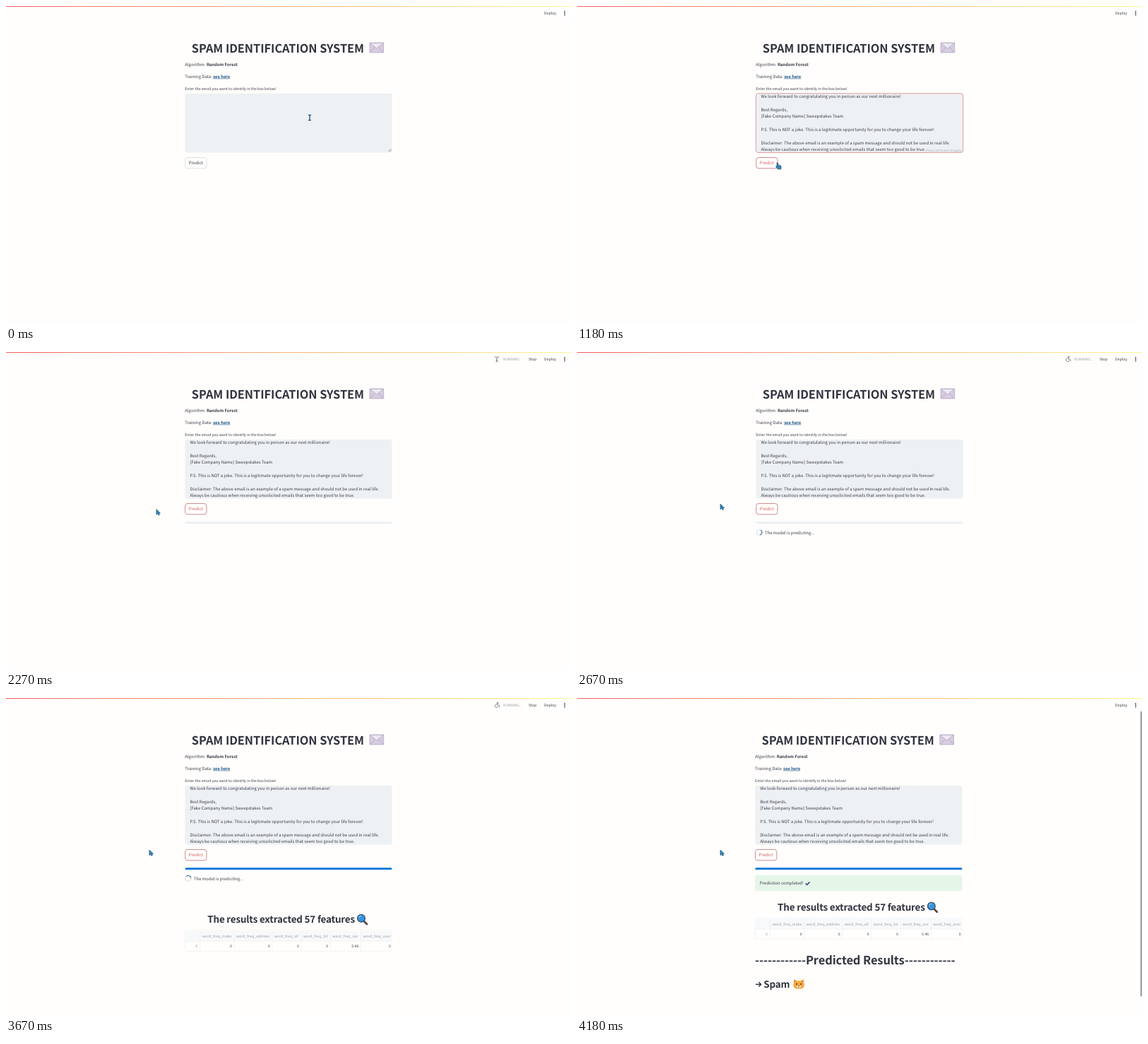
Write an HTML page that moves like this. It is 800 px wide and 450 px high and loops after 4.33 s.

```html
<!DOCTYPE html>
<html lang="en">
<head>
<meta charset="utf-8">
<title>Spam identification system</title>
<style>
html, body { margin: 0; width: 100%; height: 100%; overflow: hidden; background: #fffefc; }
svg { display: block; width: 800px; height: 450px; }
text {
  font: 5.97px "Source Sans Pro", "Noto Sans CJK JP", "Noto Sans CJK SC", "Noto Sans CJK", "Open Sans", sans-serif;
  fill: #3a3c47; white-space: pre; text-rendering: geometricPrecision;
}
.h1 { font-size: 16.41px; font-weight: 700; letter-spacing: -.005em; fill: #31333f; }
.h2 { font-size: 13.43px; font-weight: 600; letter-spacing: -.014em; fill: #31333f; }
.b { font-weight: 600; letter-spacing: -.01em; }
.small { font-size: 5.22px; }
.tiny { font-size: 4.4px; fill: #a3a8b4; }
.gray { fill: #9a9da6; }
.end { text-anchor: end; }
</style>
</head>
<body>
<svg viewBox="0 0 800 450">
  <defs>
    <linearGradient id="rainbow">
      <stop offset="0" stop-color="#f04a4a"/><stop offset=".5" stop-color="#fba765"/><stop offset="1" stop-color="#fdf486"/>
    </linearGradient>
    <clipPath id="boxClip"><rect x="253" y="124" width="294" height="83.3"/></clipPath>
    <clipPath id="tableClip"><rect x="253" y="328" width="293.6" height="31"/></clipPath>
    <clipPath id="barClip"><rect x="253.3" y="240" width="293.4" height="3.3" rx="1.6"/></clipPath>
  </defs>
  <rect width="800" height="450" fill="#fffefc"/>
  <rect width="800" height=".9" fill="url(#rainbow)"/>

  <text class="small" x="762" y="12">Deploy</text>
  <g fill="#31333f"><circle cx="791" cy="7.8" r=".85"/><circle cx="791" cy="10.2" r=".85"/><circle cx="791" cy="12.6" r=".85"/></g>
  <g id="running">
    <text class="small gray" style="font-size:5.05px" x="704" y="12">RUNNING...</text>
    <text class="small" x="740" y="12">Stop</text>
    <g fill="none" stroke="#777a83" stroke-width=".9" stroke-linecap="round">
      <path class="pose" d="M691 10.2h8M691 12.8h8M692 6l3 2 3-1.5M694 9l3-1.5"/>
      <path class="pose" d="M695.5 6v4h2.5l1 3M698 6.5l-2.5 1.5M694 8.7a2.5 2.5 0 1 0 3 3.4"/>
      <path class="pose" d="M692 6.5l3 2 3-2M695 8.5v2.5l-1 3M695 11l1 3M695 6.2v.2"/>
    </g>
  </g>

  <g id="page">
    <text class="h1" x="262.8" y="65.7">SPAM IDENTIFICATION SYSTEM</text>
    <g stroke="#a596b6" stroke-width=".6">
      <rect x="515" y="52" width="19.7" height="14" rx=".8" fill="#d6cde0"/>
      <path d="M515.3 52.3h19.1l-9.6 8zM515.3 65.7l7-7.3M534.4 65.7l-7-7.3" fill="#ece7f1"/>
    </g>
    <text x="253.3" y="84.6">Algorithm: <tspan class="b">Random Forest</tspan></text>
    <text x="253.3" y="101.6">Training Data: <tspan class="b" fill="#1d5488" text-decoration="underline">see here</tspan></text>
    <text class="small" x="253.3" y="118.8" fill="#54584f">Enter the email you want to identify in the box below!</text>

    <rect id="box" x="253.4" y="123.8" width="293.2" height="83.6" rx="3.2" fill="#eef1f4" stroke-width=".8"/>
    <path id="grip" d="M541.5 206l3.8-3.8M543.5 206l1.8-1.8" stroke="#777" stroke-width=".7"/>
    <g id="mail" clip-path="url(#boxClip)">
      <text class="tiny end" id="hint" x="544.5" y="205.5">Press Ctrl+Enter to apply</text>
      <rect id="thumb" x="543.8" y="182" width="2.4" height="20" fill="#8b8e93"/>
    </g>
    <rect id="caret" y="199" width=".6" height="7.4" fill="#31333f"/>

    <rect id="button" x="253.7" y="214.5" width="30.3" height="15.3" rx="3.3" fill="#fffefc" stroke-width=".7"/>
    <text id="predict" x="258.8" y="224.3">Predict</text>

    <g id="bar" clip-path="url(#barClip)">
      <rect x="253.3" y="240" width="293.4" height="3.3" fill="#ebf0f5"/>
      <rect id="fill" x="253.3" y="240" height="3.3" rx="1.6" fill="#1c7fda"/>
    </g>
    <g id="spinner" fill="none" stroke-width="1.1">
      <circle cx="258" cy="255.3" r="4" stroke="#d9dce2"/>
      <path id="arc" d="M262 255.3a4 4 0 0 1-6.6 3" stroke="#3c6a9c"/>
      <text x="266" y="257.5">The model is predicting...</text>
    </g>

    <g id="features">
      <text class="h2" x="285.3" y="318.2">The results extracted 57 features</text>
      <path d="M507 316l4 4" stroke="#5b4a4a" stroke-width="2.8" stroke-linecap="round"/>
      <circle cx="503" cy="311.7" r="5.4" fill="#3a94dc" stroke="#31516f" stroke-width="1.3"/>
      <path d="M500 311a3.4 3.4 0 0 1 3-2.8" fill="none" stroke="#a9d8f5" stroke-width="1"/>
      <g id="table" clip-path="url(#tableClip)">
        <rect x="253.6" y="329" width="292.8" height="29.3" rx="2" fill="#fffefc" stroke="#e6e8ec" stroke-width=".5"/>
        <path d="M253.6 344V331a2 2 0 0 1 2-2h291v15z" fill="#f8f9fa"/>
        <path d="M253.6 344h293M275 329v29.3" stroke="#e6e8ec" stroke-width=".5"/>
        <text class="small gray end" x="271.2" y="353.4">0</text>
      </g>
    </g>

    <g id="result">
      <rect x="253.3" y="250.4" width="293.4" height="22.8" rx="3.3" fill="#e5f6e9"/>
      <text x="260" y="264.3" fill="#66765a">Prediction completed!</text>
      <path d="M324.8 262.4l2 2 4-4" fill="none" stroke="#47508c" stroke-width="1.7"/>
      <text class="h1" x="253.3" y="376.9">------------Predicted Results------------</text>
      <path d="M254.3 405.2h7.2M258.6 402l3.2 3.2-3.2 3.2" fill="none" stroke="#31333f" stroke-width="1.4"/>
      <text class="h2" x="265.4" y="409.6">Spam</text>
      <g id="cat">
        <path d="M308 404l.3-6.2 4.2 2.4h5.6l4.2-2.4.3 6.2c2 5-2 7.8-7.3 7.8s-9.300-2.800-7.300-7.800z" fill="#f6a93b"/>
        <path d="M309.400 402v-2.500l2 1.300zM321.200 402v-2.500l-2 1.300z" fill="#e8756a"/>
        <circle cx="312.200" cy="404.700" r="1" fill="#3b3230"/><circle cx="318.400" cy="404.700" r="1" fill="#3b3230"/>
        <ellipse cx="315.300" cy="408.600" rx="3" ry="2" fill="#fbe3bd"/>
        <path d="M314.400 407h1.800l-.9 1zM313.600 409.300h3.400" fill="#4a3530" stroke="#4a3530" stroke-width=".4"/>
      </g>
    </g>
  </g>
  <rect id="scroll" x="797.6" y="19" width="2.4" height="403" fill="#a3a3a3"/>

  <g id="cursor">
    <path class="cur" d="M-2-3.700h4M-2 3.700h4M0-3.700v7.400" stroke="#1c4f7c" stroke-width="1.300"/>
    <path class="cur" d="M-.5 0q1-.8 1.500.4l.6 2.800 3.200.8q1 .4.800 1.600l-.5 3.200h-4.300l-2.600-3.400q0-1.200 1.500-.6z" fill="#2f86bd" stroke="#173f60" stroke-width=".7"/>
    <path class="cur" d="M.3 0v7.400l1.800-1.500 1.300 2.300 1.300-.7-1.200-2.300h2.200z" fill="#2b8fce" stroke="#173f60" stroke-width=".7"/>
  </g>
</svg>
<script>
const LOOP = 4330;
const $ = id => document.getElementById(id);
const show = (el, on) => el.style.display = on ? '' : 'none';
const set = (el, attrs) => { for (const k in attrs) el.setAttribute(k, attrs[k]); };

function addText(parent, str, x, y, cls = '') {
  const el = document.createElementNS('http://www.w3.org/2000/svg', 'text');
  set(el, { x, y, class: cls });
  el.textContent = str;
  parent.prepend(el);
  return el;
}

const lines = [
  'We look forward to congratulating you in person as our next millionaire!', '',
  'Best Regards,', '[Fake Company Name] Sweepstakes Team', '',
  'P.S. This is NOT a joke. This is a legitimate opportunity for you to change your life forever!', '',
  'Disclaimer: The above email is an example of a spam message and should not be used in real life.',
  'Always be cautious when receiving unsolicited emails that seem too good to be true.'
].map((s, i) => addText($('mail'), s, 260.4, 130.2 + i * 9.33));

// Each column: name, left edge, right edge, value
[['make', 275, 323, 0], ['address', 323, 377, 0], ['all', 377, 418, 0],
 ['3d', 418, 459.4, 0], ['our', 459.4, 502.6, 5.46], ['over', 502.6, 548, 0]].forEach(([name, left, right, value]) => {
  const edge = document.createElementNS('http://www.w3.org/2000/svg', 'path');
  set(edge, { d: `M${right} 329v29.3`, stroke: '#e6e8ec', 'stroke-width': .5 });
  $('table').append(edge, addText($('table'), 'word_freq_' + name, left + 2.9, 338.9, 'small gray'),
    addText($('table'), value, right - 3.2, 353.4, 'small end'));
});

// Pointer hot spot: time, x, y
const path = [
  [0, 430, 158], [210, 430, 158], [600, 414.5, 175], [780, 414.5, 175],
  [1150, 283.5, 222], [1360, 283.5, 222], [1700, 273, 222], [1920, 273, 222],
  [2240, 212.7, 222.7], [2290, 212.7, 222.7], [2420, 202.7, 215.2], [LOOP, 202.7, 215.2]
];

function pointer(t) {
  const i = path.findIndex(p => p[0] > t);
  const [t0, x0, y0] = path[i - 1], [t1, x1, y1] = path[i];
  const u = (t - t0) / (t1 - t0), e = u * u * (3 - 2 * u);
  return [x0 + (x1 - x0) * e, y0 + (y1 - y0) * e];
}

const poses = document.querySelectorAll('.pose'), cursors = document.querySelectorAll('.cur');
const caretX = 260.6 + lines[8].getComputedTextLength();

function draw(t) {
  const [x, y] = pointer(t);
  const overBox = x > 253 && x < 547 && y > 123 && y < 208;
  const overButton = x > 253 && x < 284.5 && y > 214 && y < 230;
  const clicked = t >= 1930, focused = t >= 210 && !clicked, pasted = t >= 400;
  const done = t >= 3940;

  set($('cursor'), { transform: `translate(${x} ${y})` });
  const kind = overBox ? 0 : overButton ? 1 : 2;
  cursors.forEach((c, i) => show(c, i === kind));

  set($('box'), { stroke: focused ? '#dc8585' : 'none' });
  show($('mail'), pasted);
  show($('hint'), !clicked);
  show($('thumb'), t < 1000);
  show($('grip'), !pasted);
  show($('caret'), focused && Math.floor((t - 210) / 500) % 2 === 0);
  set($('caret'), pasted ? { x: caretX, y: 199 } : { x: 260.4, y: 126 });

  const red = overButton || clicked;
  set($('button'), { stroke: red ? '#bd5d60' : '#d4d5d9' });
  $('predict').style.fill = red ? '#cf5a59' : '';

  show($('running'), clicked && t < 4100);
  const pose = Math.floor((t - 1930) / 170) % 3;
  poses.forEach((p, i) => show(p, i === pose));

  show($('bar'), t >= 2100);
  const progress = Math.min(1, Math.max(0, (t - 2850) / 765));
  set($('fill'), { width: 293.4 * progress });
  show($('spinner'), t >= 2600 && !done);
  set($('arc'), { transform: `rotate(${t - 3090} 258 255.3)` });

  show($('features'), t >= 3640);
  set($('features'), { transform: `translate(0 ${done ? -17.2 : 0})` });
  show($('result'), done);
  show($('cat'), t >= 4150);
  show($('scroll'), done);
  set($('page'), { transform: `translate(${done ? -1.2 : 0} 0)` });
}

const start = performance.now();
function tick() {
  draw((performance.now() - start) % LOOP);
  requestAnimationFrame(tick);
}
draw(0);
requestAnimationFrame(tick);
</script>
</body>
</html>
```
